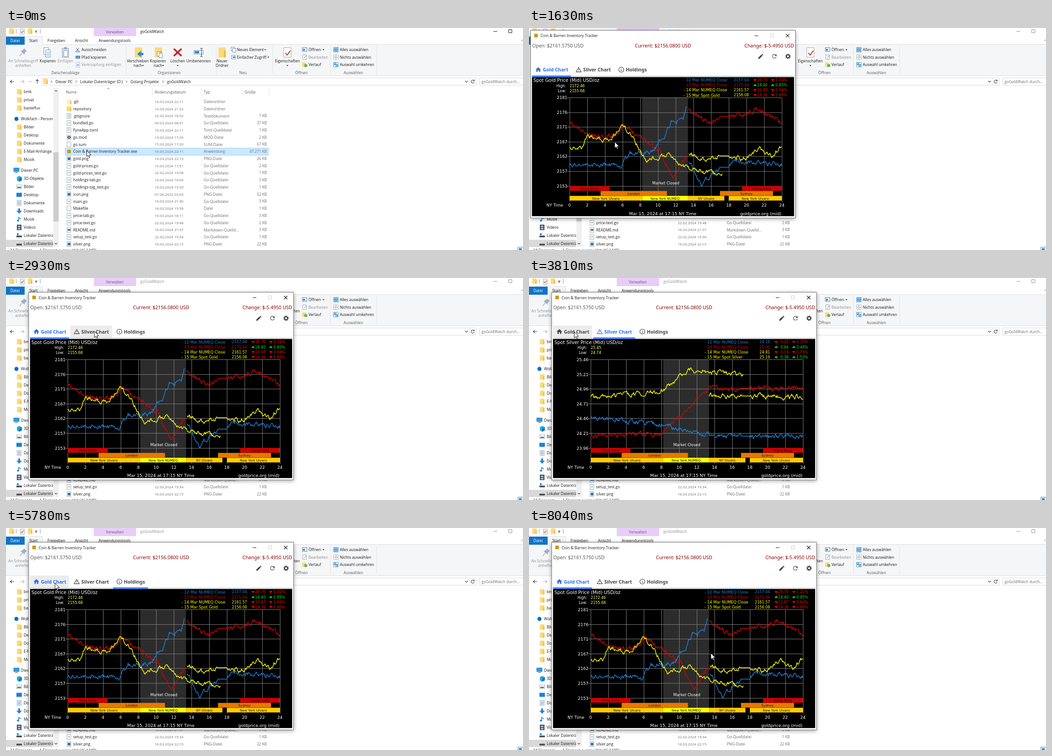
Animation of 1140x491 px, one loop 8120 ms. Source, as an HTML page:

```html
<!DOCTYPE html>
<html lang="de">
<head>
<meta charset="utf-8">
<title>Portfolio</title>
<style>
html, body { margin: 0; width: 100%; height: 100%; overflow: hidden; background: #fff; }
svg { display: block; width: 100vw; height: 100vh; }
.ui { font-family: "Open Sans", sans-serif; }
.app { font-family: "Noto Sans", sans-serif; }
.chart { font-family: "DejaVu Sans", sans-serif; }
.shadow { filter: drop-shadow(0 2px 5px #0006); }
</style>
</head>
<body>
<svg id="stage" viewBox="0 0 1140 491"></svg>
<script>
const LOOP = 8120, FRAME = 77;
const MID = 'text-anchor="middle"', END = 'text-anchor="end"', BOLD = 'font-weight="700"';
const GREY = '#6d6d6d', PALE = '#8f8f8f', DARK = '#1a1a1a', INK = '#565656', BLUE = '#296ff6';
const STEEL = '#5f87ad', SKY = '#2d86d4', CAPTION = '#5c5c5c';

// ---- drawing helpers: y of a text is its visual middle ----
const txt = (x, y, s, fill = DARK, size = 8.45, more = '') =>
  `<text x="${x}" y="${y + size * .36}" fill="${fill}" font-size="${size}" ${more}>${s.replace(/&/g, '&amp;')}</text>`;
const rect = (x, y, w, h, fill, more = '') =>
  `<rect x="${x}" y="${y}" width="${w}" height="${h}" fill="${fill}" ${more}/>`;
const dot = (x, y, r, fill, more = '') => `<circle cx="${x}" cy="${y}" r="${r}" fill="${fill}" ${more}/>`;
const stroke = (d, color, width = 1, more = '') =>
  `<path d="${d}" fill="none" stroke="${color}" stroke-width="${width}" ${more}/>`;
const shape = (d, fill, more = '') => `<path d="${d}" fill="${fill}" ${more}/>`;
const columns = (xs, y, h, color) => stroke(xs.map(x => `M${x + .5} ${y}v${h}`).join(''), color);
const each = (list, draw) => list.map(draw).join('');
const caret = (x, y) => shape(`M${x - 2.2} ${y - 1}h4.4l-2.2 2.6z`, '#333');
const folder = (x, y, w = 10, h = 11, fill = '#fbdb77') =>
  rect(x, y, w, h, fill, 'rx="1"') + rect(x + w * .75, y + h * .3, w * .25, h * .7, '#e9bb48');
const page = (x, y, w, h, line = '#9aa0a6') =>
  rect(x + .5, y + .5, w - 1, h - 1, '#fff', `stroke="${line}" stroke-width=".9"`);
const lines = (x, y, w, n, gap, color = '#8a9aab') =>
  stroke(each(Array.from({ length: n }), (_, i) => `M${x} ${y + i * gap}h${w}`), color, .8);

// ---- file explorer ----
const APP = 'Coin & Barren Inventory Tracker';
const KINDS = { go: 'Go-Quelldatei', png: 'PNG-Datei', text: 'Textdokument', toml: 'Toml-Quelldatei', mod: 'MOD-Datei',
  sum: 'SUM-Datei', app: 'Anwendung', file: 'Datei', md: 'Markdown-Quelld...', git: 'Dateiordner', folder: 'Dateiordner' };
const FILES = `.git|16.03.2024 22:11|git|
repository|14.03.2024 21:32|folder|
.gitignore|22.02.2024 18:52|text|1 KB
bundled.go|09.03.2024 08:41|go|37 KB
FyneApp.toml|16.03.2024 22:11|toml|1 KB
go.mod|15.03.2024 17:20|mod|2 KB
go.sum|15.03.2024 17:20|sum|67 KB
${APP}.exe|16.03.2024 22:11|app|47.271 KB
gold.png|16.03.2024 22:15|png|26 KB
gold-prices.go|10.03.2024 17:51|go|2 KB
gold-prices_test.go|22.02.2024 19:38|go|1 KB
holdings-tab.go|16.03.2024 16:09|go|3 KB
holdings-tag_test.go|16.03.2024 15:29|go|1 KB
icon.png|07.06.2022 22:03|png|52 KB
main.go|16.03.2024 21:40|go|3 KB
Makefile|16.03.2024 15:58|file|1 KB
price-tab.go|10.03.2024 18:11|go|3 KB
price-text.go|22.02.2024 19:48|go|2 KB
README.md|16.03.2024 21:37|md|3 KB
setup_test.go|22.02.2024 19:34|go|1 KB
silver.png|16.03.2024 22:15|png|22 KB`.split('\n').map(r => r.split('|'));

function fileIcon(kind, y) {
  if (kind === 'git') return folder(134, y - 5.5, 10, 11, '#fdf0c0');
  if (kind === 'folder') return folder(134, y - 5.5);
  if (kind === 'app') return rect(135, y - 4, 8, 8, '#c79a1e');
  const inner = {
    text: lines(136.5, y - 3, 5, 4, 2), toml: lines(136.5, y - 3, 4, 3, 2), go: rect(137, y - 1, 4, 1.6, '#6aa9b8'),
    mod: dot(139, y, 2.4, 'none', 'stroke="#333" stroke-width="1.8"'),
    png: rect(136, y - 3, 6, 6, '#2a78b8'), md: rect(136, y - 2, 6, 4, '#3b6fb0')
  }[kind] || '';
  return page(134, y - 6, 9.5, 12) + inner;
}

function fileList() {
  const head = { Name: 132, 'Änderungsdatum': 328, Typ: 436, 'Größe': 526 };
  return each(Object.entries(head), ([n, x]) => txt(x, 141.5, n, '#4c607a')) +
    columns([322, 430, 520, 580], 133, 18, '#e2e2e2') + stroke('M222.5 135.5l3-3 3 3', '#666') +
    rect(130.5, 265.5, 448, 16, '#cce8ff', 'stroke="#99d1ff"') +
    each(FILES, ([name, date, kind, size], i) => {
      const y = 163 + i * 15.75;
      return fileIcon(kind, y) + txt(148, y, name) + txt(328, y, date, GREY, 8) +
        txt(436, y, KINDS[kind], GREY) + txt(575, y, size, GREY, 8.2, END);
    });
}

function sidebar() {
  const group = (names, top, icon) => each(names, (n, i) => icon(top + i * 18, n) + txt(39, top + i * 18, n));
  const dir = y => folder(24, y - 6, 10, 12);
  const drive = y => rect(23, y, 12, 4, '#555');
  const places = {
    '3D-Objekte': y => shape(`M24 ${y - 3}l5-3 6 3v7l-6 3-5-3z`, '#29a9d8') + shape(`M29 ${y}l6-3v7l-6 3z`, '#0f79b5'),
    Bilder: y => page(23, y - 4.5, 12, 9) + rect(25, y, 8, 3, '#3a85c8'),
    Desktop: y => rect(23, y - 4.5, 12, 9, '#1683d8'),
    Dokumente: y => page(24, y - 6, 10, 12) + lines(26, y - 3, 6, 4, 2, '#3a85c8'),
    Downloads: y => shape(`M27 ${y - 6}h4v5h4l-6 7-6-7h4z`, '#2f7fcb'),
    Musik: y => stroke(`M28 ${y + 3}v-8q1 3 5 4`, '#1b8be0', 1.6) + dot(26.5, y + 3, 2.3, '#1b8be0'),
    Videos: y => rect(24, y - 6, 10, 12, '#3b4350') + rect(26, y - 4, 6, 3.5, '#a8bdd6') + rect(26, y + 1, 6, 3.5, '#a8bdd6'),
    'Lokaler Datenträger (C:)': y => drive(y) + rect(24, y - 5, 4, 4, '#1b8be0'),
    'Lokaler Datenträger (D:)': drive
  };
  return `<clipPath id="side"><path d="M0 130h103.5v361H0z"/></clipPath><g clip-path="url(#side)">` +
    rect(0, 468.5, 104, 16, '#d9d9d9') + group(['bmk', 'privat', 'bastelfux'], 141, dir) +
    dot(23, 201, 4.5, '#0f6cbd') + txt(33, 201, 'Wolkfach - Person') +
    group(['Bilder', 'Desktop', 'Dokumente', 'E-Mail-Anhänge', 'Musik'], 219, dir) +
    rect(17, 309.5, 12, 8, '#2f9be0', 'stroke="#44708f" stroke-width=".8"') + rect(20, 319, 6, 1.2, '#555') +
    txt(33, 315, 'Dieser PC') + group(Object.keys(places), 333, (y, n) => places[n](y)) + '</g>' +
    rect(104.5, 133, 12, 351, '#f0f0f0') + rect(104.5, 275, 11.5, 153, '#cdcdcd') +
    stroke('M107.5 140.5l2.7-2.7 2.7 2.7M107.5 475.5l2.7 2.7 2.7-2.7', '#505050', 1.2) +
    txt(9, 492, '34 Elemente', '#444') + txt(74, 492, '1 Element ausgewählt (46,1 MB)', '#444') +
    rect(1128.5, 484.5, 13, 9, '#cfe8fa', 'stroke="#5aa5d6"') + rect(1131, 487, 6, 6, '#3b8cc4');
}

function ribbon() {
  const label = (x, y, s, c = DARK) => txt(x, y, s, c, 8.45, MID);
  const stack = (x, names, color = DARK) => each(names, (n, i) => label(x, 73 + i * 10, n, color));
  const list = (x, names) => each(names, (n, i) => txt(x, 48 + i * 16.5, n, /^(Verknüpf|Bearbeiten)/.test(n) ? PALE : DARK));
  const captions = { Zwischenablage: 131, Organisieren: 359.5, Neu: 522.5, 'Öffnen': 651.5, 'Auswählen': 766 };
  const tabs = { Start: 60.5, Freigeben: 111, Ansicht: 166.5, Anwendungstools: 239.5 };
  const bigFolder = x => folder(x - 8, 43, 16, 22);
  const tiles = row => each([0, 1, 2, 3], i => rect(722.5 + i % 2 * 5.5, 43 + row * 16.5 + (i >> 1) * 5.5, 4.5, 4.5,
    row === 0 || row === 2 && i % 3 === 0 ? '#8cc6f3' : '#fff', `stroke="${row === 1 ? '#aaa' : '#3b8cc4'}" stroke-width=".8"`));
  const titleBar = rect(193.5, 0, 93.5, 18, '#e7cdf7') + label(240, 9, 'Verwalten', '#6c5678') +
    folder(7, 1, 10, 12) + page(31, 2, 10, 12) + stroke('M33 8l2 2.5 4-5', '#c4472a', 1.3) + folder(48, 1, 10, 12) +
    columns([22, 75], 2, 10, '#999') + caret(66.5, 9) + stroke('M64 6.5h5', '#333') + stroke('M1136 29l3-3 3 3', '#777');
  const clipboard = shape('M39 45l7 6-2 1-3 4v3l-9-8 3-1 4-3z', '#9fb0c2') + stroke('M36 55l-6 7', '#9fb0c2', 1.4) +
    stack(38, ['An Schnellzugriff', 'anheften'], PALE) +
    page(83, 43, 11, 16, STEEL) + page(87, 48, 11, 17, STEEL) + lines(89, 53, 7, 4, 2.7, '#5b9bd5') + stack(92, ['Kopieren']) +
    rect(124, 45, 14, 20, '#cfdbe6', 'stroke="#8ba3b8"') + rect(128, 42.5, 6, 4, '#8ba3b8') + page(127, 50, 9, 13) + stack(131, ['Einfügen'], PALE) +
    stroke('M155 44l5 7M161 44l-5 7', '#555') + each([155.5, 160.5], x => dot(x, 52, 1.7, 'none', 'stroke="#2779c4"')) +
    rect(153.5, 61.5, 10, 6, '#3b7ab8') + lines(155, 64.5, 7, 1, 1, '#fff') + page(154, 76, 9, 11, '#9fb4c9') + rect(156, 80, 5, 4, '#9cbcdc') +
    list(166.5, ['Ausschneiden', 'Pfad kopieren', 'Verknüpfung einfügen']);
  const organise = bigFolder(292) + shape('M303 55h-6v-4l-8 6.5 8 6.5v-4h6z', SKY) + stack(290.5, ['Verschieben', 'nach']) + caret(302, 83) +
    bigFolder(336) + page(333, 52, 7, 11, STEEL) + page(337, 55, 8, 11, STEEL) + stack(335, ['Kopieren', 'nach']) + caret(346.5, 83) +
    stroke('M370 46l17 16M387 46l-17 16', '#d3141f', 3.6) + stack(378.5, ['Löschen']) + caret(378.5, 83) +
    page(414, 49, 21, 9, STEEL) + rect(416, 51, 10, 5, SKY) + stroke('M428 45h6M431 45v18M428 63h6', '#444', 1.2) + stack(424.5, ['Umbenennen']);
  const create = bigFolder(476.5) + stack(476.5, ['Neuer', 'Ordner']) +
    page(496, 42, 8, 9, STEEL) + page(499, 45, 8, 9, STEEL) + page(497, 60, 9, 9, STEEL) + rect(500, 63, 5, 3, SKY) +
    list(509, ['Neues Element', 'Einfacher Zugriff']) + caret(571.5, 48) + caret(578.5, 64.5);
  const open = page(612, 43, 17, 22) + stroke('M616 55l4 5 7-10', '#d8481f', 2.2) + stack(620.5, ['Eigenschaften']) + caret(620.5, 83) +
    rect(653.5, 43.5, 10, 8, '#fff', 'stroke="#3b7ab8"') + rect(655, 46, 4, 4, SKY) + caret(700, 48) +
    page(654, 59, 9, 11) + stroke('M657 67l5-6', '#9fb4c9', 1.3) + folder(653, 76, 8, 10) + dot(661, 83, 3.5, '#66b26a') +
    list(667, ['Öffnen', 'Bearbeiten', 'Verlauf']);
  return rect(0, 36.5, 1140, 68.5, '#f5f6f7') + stroke('M0 36.5H41.5V18.5H80.5V36.5H1140M0 105.5H1140', '#dcdddf') +
    rect(42, 19, 38, 19, '#f5f6f7') + rect(0, 19, 41, 18, '#1173c7') + label(20, 28, 'Datei', '#fff') + titleBar +
    each(Object.entries(tabs), ([n, x]) => label(x, 28, n)) +
    each(Object.entries(captions), ([n, x]) => label(x, 98.5, n, CAPTION)) +
    columns([264, 463, 588, 715, 817], 40, 62, '#e1e2e4') + clipboard + organise + create + open +
    each([0, 1, 2], tiles) + list(736, ['Alles auswählen', 'Nichts auswählen', 'Auswahl umkehren']);
}

function addressBar() {
  const crumbs = { 'Dieser PC': 109, 'Lokaler Datenträger (D:)': 163.5, 'Golang Projekte': 274.5, goGoldWatch: 355 };
  return rect(79.5, 110.5, 957, 16, '#fff', 'stroke="#d9d9d9"') + rect(1044.5, 110.5, 110, 16, '#fff', 'stroke="#d9d9d9"') +
    stroke('M18 118.5h-8.5m3.5-3.5l-3.5 3.5 3.5 3.5M69 123v-9m-3.5 3.5l3.5-3.5 3.5 3.5', '#444', 1.2) +
    stroke('M31 118.5h9m-3.5-3.5l3.5 3.5-3.5 3.5M51 117l2.5 2.5 2.5-2.5', '#b5b5b5', 1.1) +
    stroke('M1012.5 117l3 3 3-3M1032 116.5a3.5 3.5 0 1 0 .5 3m0-5.5v3h-3', '#444', 1.1) +
    columns([1022], 111, 15, '#e5e5e5') + folder(82, 112, 10, 12) +
    each(Object.entries(crumbs), ([s, x]) => stroke(`M${x - 10} 116l2.5 2.5-2.5 2.5`, '#444') + txt(x, 118.5, s)) +
    txt(1048.5, 118.5, 'goGoldWatch durch...', GREY);
}

const explorer = () => `<g class="ui">${ribbon()}${addressBar()}${sidebar()}${fileList()}
  <g id="head">${txt(296, 7.5, 'goGoldWatch', 'currentColor')}${stroke('M1075 7.5h8M1108.5 3.5h7v7h-7z', 'currentColor')}</g></g>`;

// ---- price charts: key points are hour,price; the texture between them is seeded noise ----
const [COLD, RED, WARM, LIME] = ['#1e80d8', '#d80000', '#ffff00', '#00f000'];
const GOLD = {
  metal: 'Gold', top: 2181, bottom: 2153, digits: 0, high: '2172.46', low: '2155.68',
  legend: ['2157.04 26.70 1.22%', '2175.44 +18.40 0.85%', '2161.57 13.87 0.64%', '2156.08 19.36 0.89%'],
  series: [
    [RED, '0,2172.8 2.2,2169 4.9,2169 6,2171.8 8,2169 10.3,2163.5 11.7,2155.3 13.4,2163.5'],
    [RED, '13.4,2177 16,2173 17,2175.1 18,2175.1 21.1,2177 23,2175 24,2172.4'],
    [COLD, '0,2160 6,2159.5 6.8,2163.5 9.3,2164 10.7,2168.7 11.5,2173.3 12.8,2174 13.3,2178.8'],
    [COLD, '13.5,2161 15,2153.6 17,2159 18,2159 18.5,2161 24,2160'],
    [WARM, '13.5,2163.3 15,2161.5 17,2162.6 18,2162.6 20,2161.5 21.5,2165 22.8,2162.4 24,2165.2'],
    [WARM, '0,2165 1.4,2164.8 2,2169 4.4,2167 6,2172.2 7.3,2168 8.6,2161 11,2163.3 13.7,2158.3 17.3,2156.4']
  ]
};
const SILVER = {
  metal: 'Silver', top: 25.46, bottom: 23.96, digits: 2, high: '25.45', low: '24.74',
  legend: ['24.16 0.33 1.35%', '25.00 +0.84 3.48%', '24.81 0.19 0.76%', '25.19 +0.38 1.53%'],
  series: [
    [RED, '0,24.16 8,24.2 13.4,24.97 24,24.98'], [COLD, '0,24.48 8,24.36 13.4,24.17 24,24.15'],
    [WARM, '13.4,24.85 24,24.83'], [WARM, '0,24.82 8,24.92 11,25.29 17.3,25.19']
  ]
};
const BANDS = [[0, 4.5, 0, '#d00000', 'Hong Kong'], [19.5, 24, 0, '#d00000', 'Hong Kong'],
  [3.5, 11, 1, '#e67800', 'London'], [17, 23, 1, '#e67800', 'Sydney'],
  [0, 8.2, 2, '#ffcc00', 'New York Ulvaro'], [8.2, 13.4, 2, WARM, 'New York NUMEQ'],
  [13.4, 17.5, 2, '#ffcc00', 'NY Ulvaro'], [18, 24, 2, '#ffcc00', 'New York Ulvaro']];
const hourX = h => 136 + h * 19.5;

let seed = 11;
const random = () => (seed = (seed * 16807) % 2147483647) / 2147483647;

function priceLine(color, data, toY) {
  const keys = data.split(' ').map(p => p.split(',').map(Number));
  const last = keys[keys.length - 1][0], points = [];
  let drift = 0;
  for (let h = keys[0][0]; h <= last; h += 1 / 12) {
    drift = .6 * drift + 9 * (random() - .5);
    const quiet = h > 17 && h < 18 && last === 24;
    points.push(`${hourX(h).toFixed(1)} ${(toY(track(keys, h)[0]) + (quiet ? 0 : drift)).toFixed(1)}`);
  }
  return stroke(`M${points.join('L')}`, color, 1.5, 'stroke-linejoin="round"');
}

function chart({ metal, top, bottom, digits, high, low, legend, series }) {
  const days = ['12 Mar NUMEQ Close', '13 Mar NUMEQ Close', '14 Mar NUMEQ Close', `15 Mar Spot ${metal}`];
  const toY = v => 180.5 + (top - v) / (top - bottom) * 195.6;
  const range = { 'High:': high, 'Low:': low };
  let s = rect(53, 135, 578, 307.5, '#000') + rect(296, 180, 101, 218, '#2c2c2c') +
    txt(56, 142, `Spot ${metal} Price (Mid) USD/oz`, '#fff', 10.1) +
    each(Object.entries(range), ([n, v], i) => txt(128, 154 + i * 11, n, '#fff', 8, END) + txt(136, 154 + i * 11, v, '#ffff66', 8.1));
  for (let i = 0; i <= 6; i++) {
    const v = top - (top - bottom) * i / 6, y = Math.round(toY(v) - .5) + .5;
    s += stroke(`M131 ${y}H604`, '#808080') + txt(131, y, (digits ? v : Math.floor(v)).toFixed(digits), '#fff', 9.1, END);
  }
  for (let h = 0; h <= 24; h += 2)
    s += columns([hourX(h)], 180, 231, '#808080') + txt(hourX(h), 418.5, `${h}`, '#fff', 9.1, MID);
  s += each(BANDS, ([from, to, row, color, name]) => rect(hourX(from), 376 + row * 10.8, (to - from) * 19.5, 10.3, color) +
    txt(hourX((from + to) / 2), 381.7 + row * 10.8, name, '#221100', 7.4, MID)) +
    each(series, ([color, data]) => priceLine(color, data, toY)) +
    txt(348, 369, 'Market Closed', '#fff', 8.4, MID) + txt(85, 418.5, 'NY Time', '#fff', 8.9) +
    txt(341.5, 437, 'Mar 15, 2024 at 17:15 NY Time', '#fff', 9.5, MID) + txt(603, 437, 'goldprice.org (mid)', '#fff', 9.5, END);
  return s + each(legend, (row, i) => {
    const y = 141.5 + i * 11.1, color = [COLD, RED, WARM, WARM][i], up = row.includes('+');
    const [price, ...changes] = row.replace('+', '').split(' '), tone = up ? LIME : '#ff0000';
    return txt(387, y, `- ${days[i]}`, color, 8.55) + txt(531.5, y, price, color, 8.1, END) +
      each(changes, (c, k) => shape(`M${541 + k * 39} ${up ? y + 2 : y - 2}h8l-4 ${up ? -4.5 : 4.5}z`, tone) +
        txt(572.5 + k * 43, y, c, tone, 8.1, END));
  });
}

// ---- application window, drawn at its resting place ----
const icon = (x, y, body) => `<g transform="translate(${x} ${y}) scale(.61) translate(-12 -12)">${body}</g>`;
const ring = (r, w, more = '') => dot(12, 12, r, 'none', `stroke="currentColor" stroke-width="${w}" ${more}`);
const solid = d => shape(d, 'currentColor', 'fill-rule="evenodd"');
const PENCIL = solid('M3 17v4h4L18 10l-4-4zM20.7 7a1 1 0 0 0 0-1.4l-2.3-2.3a1 1 0 0 0-1.4 0L15 5l4 4z');
const RELOAD = solid('M17.7 6.3A8 8 0 1 0 19.7 14h-2A6 6 0 1 1 12 6q2.5 0 4.2 1.8L13 11h7V4z');
const GEAR = ring(5.4, 3.8) + ring(8.2, 3, 'pathLength="16" stroke-dasharray="1 1"');
const HOUSE = solid('M10 20v-6h4v6h5v-8h3L12 3 2 12h3v8z');
const ALERT = solid('M12 6l7.5 13h-15zM12 2L1 21h22zM13 16h-2v2h2zM13 10h-2v4h2z');
const INFO = ring(9, 2) + solid('M11 11h2v6h-2zM11 7h2v2h-2z');
const TABS = [
  { x: 53, w: 86, name: 'Gold Chart', text: 77, mark: HOUSE },
  { x: 142, w: 92, name: 'Silver Chart', text: 166, mark: ALERT },
  { x: 236, w: 77, name: 'Holdings', text: 260, mark: INFO }
];

const holdings = () => rect(53, 135, 578, 307, '#fff') + txt(59, 148.5, 'ID', INK, 10.5) +
  each(['Amount', 'Price', 'Date', 'Delete'], (n, i) => txt(100 + i * 153, 148.5, n, INK, 10.5) + columns([92 + i * 153], 135, 305, '#dedede')) +
  rect(626.5, 135, 4.5, 307, '#e2e2e2') + rect(53, 439.8, 573, 2.2, '#555');

function dialog() {
  const fields = each(['Amount in toz', 'Purchaseprice', 'Purchasedate'], (name, i) => {
    const y = 194 + i * 46.5;
    return txt(287.5, y, name, INK, 10.5, `${END} ${BOLD}`) + rect(297.5, y - 12.5, 178, 24.5, '#f3f3f3', 'rx="2" stroke="#bdbdbd"');
  });
  return rect(50, 55, 584, 391, '#000', 'opacity=".2"') + rect(192, 139, 300, 222, '#fff', 'class="shadow"') +
    txt(201, 155.5, 'Add Gold', INK, 10.5, BOLD) + fields + txt(302, 287, 'YYYY-MM-DD', '#8a8a8a', 10.5) +
    rect(276, 320, 64.5, 27, '#f4f4f4', 'rx="3"') + rect(344, 320, 64, 27, '#f7f7f7', 'rx="3"') +
    stroke('M286 330l7 7M293 330l-7 7', INK, 1.5) + txt(300, 333.5, 'Cancel', INK, 10.5, BOLD) +
    stroke('M359 334l3 3 6.5-7', '#dcdcdc', 1.5) + txt(374, 333.5, 'Add', '#dcdcdc', 10.5, BOLD);
}

const appWindow = () => `<g id="win" class="app">
  ${rect(50, 31.5, 584, 415, '#fff', 'class="shadow"')}${rect(58, 39, 8, 8, '#c79a1e')}
  <g class="ui">${txt(72, 43.5, APP, DARK, 8.5)}</g>
  ${stroke('M544 43.5h8M613 39.5l7.5 7.5m0-7.5l-7.5 7.5', '#111', 1.1)}${stroke('M578.5 39.5h7v7h-7z', '#ccc')}
  ${txt(53.5, 65.5, 'Open: $2161.5750 USD', INK, 10.5)}
  ${txt(280, 65.5, 'Current: $2156.0800 USD', '#8b0000', 10.5)}
  ${txt(631, 65.5, 'Change: $-5.4950 USD', '#8b0000', 10.5, END)}
  ${rect(551, 75, 13, 27, '#e4e4e4', 'id="penHover"')}
  <g color="#444">${each([PENCIL, RELOAD, GEAR], (m, i) => icon(557.5 + i * 30, 89, m))}</g>
  ${each(TABS, (t, i) => rect(t.x, 105, t.w, 27, '#ececec', `id="hover${i}"`) +
    `<g id="tab${i}">${icon(t.text - 10, 118.5, t.mark)}${txt(t.text, 119, t.name, 'currentColor', 10.5, BOLD)}</g>`)}
  ${rect(53, 132, 578, 3, '#d2d2d2')}${rect(53, 131.5, 86, 3, BLUE, 'id="bar"')}
  ${each([chart(GOLD), chart(SILVER)], (c, i) => `<g id="view${i}" class="chart">${c}</g>`)}
  <g id="view2">${holdings()}</g><g id="dialog">${dialog()}</g>
  ${rect(50, 31.5, 584, 415, 'none', 'stroke="#6f6f6f"')}</g>`;

// ---- motion ----
const OPENED = 840, ASKED = 6630, CANCELLED = 7890;
const DRAG = { from: 2010, to: 2540, x: 46.5, y: 26.3 };
const CLICKS = [[0, 0], [3270, 1], [4060, 0], [4610, 2], [5780, 0]];   // time, tab
const MOVES = [                                                        // start, end, pointer goal
  [0, 1, 178, 271], [1560, 1630, 189, 252], [1630, 1930, 191, 18], [DRAG.from, DRAG.to, 191 + DRAG.x, 18 + DRAG.y],
  [DRAG.to, 2930, 195, 118], [3350, 3810, 100, 119], [4120, 4440, 273, 119], [4690, 5540, 108, 122],
  [5860, 6470, 557, 98], [7030, 7650, 302, 325], [7890, 8040, 401, 277]];

const mix = (a, b, p) => a + (b - a) * p;

function track(keys, t) {
  const i = keys.findIndex(k => k[0] > t);
  if (i < 1) return keys[i < 0 ? keys.length - 1 : 0].slice(1);
  const a = keys[i - 1], b = keys[i], p = (t - a[0]) / (b[0] - a[0]);
  return a.slice(1).map((v, k) => mix(v, b[k + 1], p));
}

// Eased progress that advances once per recorded frame.
function progress(t, start, end) {
  if (t >= end) return 1;
  const p = Math.max(0, Math.floor((t - start) / FRAME) * FRAME / (end - start));
  return p * p * (3 - 2 * p);
}

const pointerAt = t => MOVES.reduce(([x, y], [start, end, gx, gy]) => {
  const p = progress(t, start, end);
  return [mix(x, gx, p), mix(y, gy, p)];
}, [178, 271]);

const $ = id => document.getElementById(id);
const set = (id, values) => Object.entries(values).forEach(([k, v]) => $(id).setAttribute(k, v));
const show = (id, on) => set(id, { display: on ? 'inline' : 'none' });

function render(t) {
  const asking = t >= ASKED && t < CANCELLED;
  const [px, py] = pointerAt(t);
  const away = progress(t, DRAG.from, DRAG.to) - 1, dx = DRAG.x * away, dy = DRAG.y * away;
  const opening = Math.min(1, Math.floor((t - OPENED) / FRAME) / 2), scale = mix(.975, 1, opening);
  const clicked = CLICKS.filter(([start]) => t >= start), [at, selected] = clicked[clicked.length - 1];
  const before = TABS[(clicked[clicked.length - 2] || CLICKS[0])[1]], slide = progress(t, at, at + 150);
  const over = (x, y, w, h) => !asking && px - dx >= x && px - dx < x + w && py - dy >= y && py - dy < y + h;

  set('head', { color: t >= OPENED ? '#8f8f8f' : '#111' });
  set('pointer', { transform: `translate(${px} ${py})` });
  show('win', t >= OPENED);
  set('win', { opacity: mix(.5, 1, opening), transform: `translate(${dx + 342} ${dy + 239}) scale(${scale}) translate(-342 -239)` });
  set('bar', { x: mix(before.x, TABS[selected].x, slide), width: mix(before.w, TABS[selected].w, slide) });
  TABS.forEach((tab, i) => {
    set('tab' + i, { color: i === selected ? BLUE : '#444' });
    show('view' + i, i === selected);
    show('hover' + i, over(tab.x, 105, tab.w, 27));
  });
  show('penHover', asking || over(546, 75, 24, 27));
  show('dialog', asking);
}

$('stage').innerHTML = explorer() + appWindow() +
  shape('M0 0v13.5l3.2-2.8 2.1 4.7 2.1-.9-2.1-4.6h4.3z', '#fff', 'id="pointer" stroke="#000" stroke-width=".9"');
const born = performance.now();
(function frame() {
  render((performance.now() - born) % LOOP);
  requestAnimationFrame(frame);
})();
</script>
</body>
</html>
```
